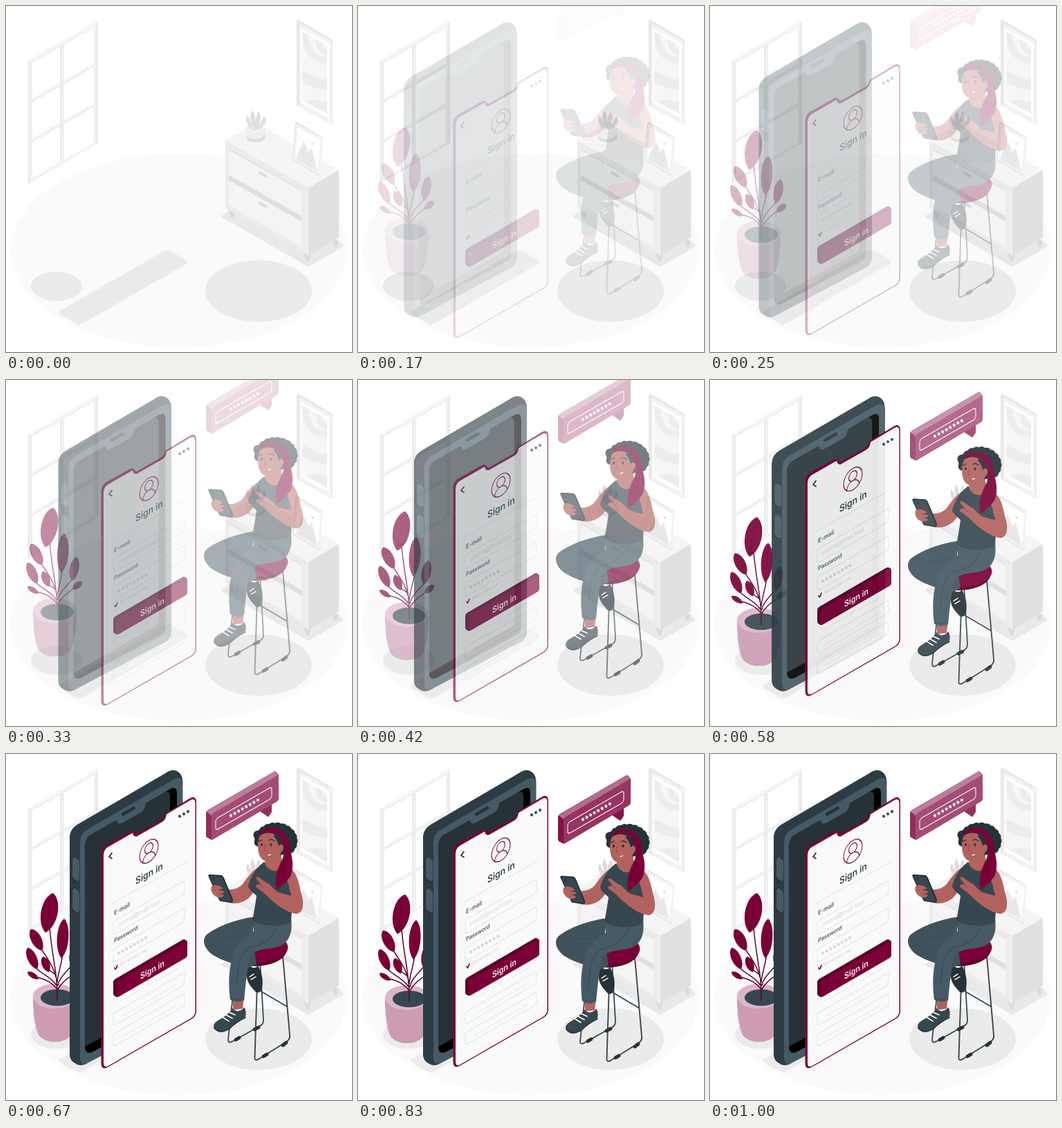
Animation, 500 px wide and 500 px high, one loop 1040 ms. Source, as an HTML page with a canvas:

```html
<!DOCTYPE html>
<html lang="en">
<head>
<meta charset="utf-8">
<title>Sign in</title>
<style>
html, body { margin: 0; width: 100%; height: 100%; overflow: hidden; background: #fff; }
canvas { display: block; width: 500px; height: 500px; }
</style>
</head>
<body>
<canvas id="stage"></canvas>
<script>
const SIZE = 500, LOOP = 1040, STEP = 1000 / 24;
const dpr = window.devicePixelRatio || 1;
const stage = document.getElementById('stage');
stage.width = stage.height = SIZE * dpr;
const view = stage.getContext('2d');

const WINE = '#7b0037', DEEP = '#5c0029', DARK = '#263238', SLATE = '#37474f',
      STEEL = '#455a64', SKIN = '#b1625f', CREASE = '#8c4548', SHADE = '#ebebeb';
let c;

function layer(paint) {
  const cv = document.createElement('canvas');
  cv.width = cv.height = SIZE * dpr * 2;
  c = cv.getContext('2d');
  c.scale(dpr * 2, dpr * 2);
  c.lineCap = c.lineJoin = 'round';
  paint();
  return cv;
}

function fill(d, color) {
  c.fillStyle = color;
  c.fill(new Path2D(d));
}

function line(d, color, width) {
  c.strokeStyle = color;
  c.lineWidth = width;
  c.stroke(new Path2D(d));
}

function oval(x, y, rx, ry, color, turn = 0) {
  c.fillStyle = color;
  c.beginPath();
  c.ellipse(x, y, rx, ry, turn, 0, Math.PI * 2);
  c.fill();
}

// Draws on the left-facing isometric plane with its origin at x, y.
function iso(x, y, paint) {
  c.save();
  c.transform(0.866, -0.5, 0, 1, x, y);
  paint();
  c.restore();
}

function isoText(x, y, text, size, weight, color) {
  iso(x, y, () => {
    c.font = `${weight} ${size}px Inter, Arial, sans-serif`;
    c.fillStyle = color;
    c.fillText(text, 0, 0);
  });
}

function isoBox(x, y, w, h, r, color, width) {
  iso(x, y, () => {
    c.beginPath();
    c.roundRect(0, 0, w / 0.866, h, r);
    c.strokeStyle = color;
    c.lineWidth = width;
    c.stroke();
  });
}

function isoDots(x, y, count, gap, r, color) {
  for (let i = 0; i < count; i++) oval(x + i * gap, y - i * gap * 0.577, r, r * 1.1, color);
}

function paintWindow() {
  fill('M32 78L133 21V198L32 257Z', '#f0f0f0');
  fill('M35 80L133 25V22L32 78Z', '#f8f8f8');
  line('M32.5 79V256', '#e6e6e6', 1.6);
  line('M132 23V198', '#e8e8e8', 1.6);
  for (let row = 0; row < 3; row++) {
    const y = row * 57.5;
    fill(`M38 ${82 + y}L78 ${59 + y}V${110 + y}L38 ${133 + y}Z`, '#fff');
    fill(`M84 ${56 + y}L127 ${31 + y}V${82 + y}L84 ${107 + y}Z`, '#fff');
    line(`M38 ${134 + y}L78 ${111 + y}M84 ${108 + y}L127 ${83 + y}`, '#f8f8f8', 2);
  }
  line('M79 58V224', '#e8e8e8', 1.4);
}

function paintArt() {
  fill('M420 21L423 20L472 49V172L420 143Z', '#e8e8e8');
  fill('M424 25L471 51V171L424 144Z', '#f3f3f3');
  fill('M426 31L467 54V163L426 140Z', '#fff');
  c.save();
  c.clip(new Path2D('M428 37L464 57V156L428 136Z'));
  fill('M428 37L464 57V156L428 136Z', '#f6f6f6');
  line('M431 35C434 62 440 80 466 77M452 48C452 62 458 67 468 66', '#ededed', 9);
  line('M426 101C440 107 448 114 468 114', '#ededed', 15);
  fill('M432 141C440 132 452 137 466 139V160Z', '#ededed');
  c.restore();
}

function paintCabinet() {
  fill('M310 304L323 296L480 338L488 347L437 377Z', '#e9e9e9');
  for (const [x, y] of [[325, 297], [434, 360], [474, 339]]) {
    fill(`M${x - 5} ${y - 5}L${x + 6} ${y}L${x + 4} ${y + 10}L${x} ${y + 9}L${x - 2} ${y + 2}Z`, '#dcdcdc');
  }
  fill('M317 194L361 168L481 237L437 263Z', '#f5f5f5');
  fill('M317 194L437 263V361L317 292Z', '#ececec');
  fill('M437 263L481 237V335L437 361Z', '#e0e0e0');
  fill('M322 206L428 267V349L322 288Z', '#e0e0e0');
  fill('M322 208L428 268V304L322 244Z', '#f4f4f4');
  fill('M322 252L428 312V349L322 288Z', '#f4f4f4');
  line('M436 263V360', '#f0f0f0', 2);
  line('M367 241L376 246M367 284.500L376 290', '#dedede', 4);

  oval(361, 189, 14, 8, '#dedede');
  fill('M346 174V185C349 195 371 195 374 185V174Z', '#efefef');
  oval(360, 174, 14, 8, '#f8f8f8');
  oval(360, 174, 11, 6, '#e6e6e6');
  for (const [x, y] of [[349, 158], [356, 151], [365, 152], [373, 159]]) {
    fill(`M360 176C${x - 6} ${y + 13} ${x - 2} ${y + 4} ${x} ${y}C${x + 5} ${y + 7} ${x + 4} ${y + 15} 360 176Z`, '#dedede');
  }

  fill('M418 168L421 168L458 190L453 246L414 223Z', '#e6e6e6');
  fill('M420 170L458 191L453 244L415 222Z', '#f3f3f3');
  fill('M422 175L455 194L450 239L418 220Z', '#fff');
  fill('M419 221L430 195L437 211L442 206L450 239Z', '#e8e8e8');
  oval(443, 199, 2, 2.300, '#e8e8e8');
}

function paintRoom() {
  oval(250, 353, 243, 140, '#fafafa');
  oval(73, 405, 37, 21, SHADE);
  fill('M77 441L227 355Q233 351 238 354L260 367Q264 370 260 373L112 458Q107 461 102 459L79 446Q75 443 77 441Z', SHADE);
  oval(365, 412, 77, 44.500, SHADE);
  paintWindow();
  paintArt();
  paintCabinet();
}

function leaf(x0, y0, x1, y1, w) {
  const dx = x1 - x0, dy = y1 - y0, n = Math.hypot(dx, dy);
  const at = (k, s) => `${x0 + dx * k - dy / n * w * s} ${y0 + dy * k + dx / n * w * s}`;
  fill(`M${x0} ${y0}C${at(0.2, 1)} ${at(0.85, 1)} ${x1} ${y1}C${at(0.85, -1)} ${at(0.2, -1)} ${x0} ${y0}Z`, WINE);
  line(`M${x0} ${y0}L${x0 + dx * 0.75} ${y0 + dy * 0.75}`, DEEP, 0.7);
}

function paintPlant() {
  fill('M39 350C39 372 41 391 46 404C54 420 88 420 95 404C100 390 102 372 102 350Z', '#cc9cb2');
  oval(70.500, 350, 31.500, 18, '#dbb6c6');
  oval(74, 352, 24, 12, SLATE);
  line('M74 356C75 318 66 290 63 250M74 330C70 308 60 296 51 282M73 334C64 322 52 318 43 309M72 320C69 316 64 314 60 311' +
    'M74 340C66 330 58 326 46 323M74 330C75 316 80 306 82 288M75 334C78 322 88 314 97 303M75 340C82 328 92 322 99 317', DEEP, 1.500);
  leaf(57, 258, 68, 201, 16);
  leaf(52, 284, 36, 253, 10);
  leaf(45, 311, 31, 280, 9);
  leaf(62, 315, 53, 293, 7.500);
  leaf(47, 325, 31, 315, 5);
  leaf(80, 295, 84, 238, 11);
  leaf(95, 307, 102, 272, 9);
  leaf(96, 319, 110, 308, 6);
}

function paintPhone() {
  fill('M92 121Q92 109 103 102L230 28Q241 20 249 26Q255.500 30 255.500 43V364Q255 373 247 378L119 446Q108 453 100 447Q92 443 92 434Z', '#2d3c44');
  fill('M107 128Q107 116 118 109L240 38Q255 29 255.500 44V364Q255 373 247 378L119 446Q107 452 107 438Z', STEEL);
  fill('M114 133Q114 122 122 117L235 52Q247 44 247 57V358Q247 365 240 369L124 431Q114 434 114 423Z', '#000');
  fill('M114 133Q114 122 122 117L228 56Q237 51 237 62V350Q237 354 232 357L114 423Z', DARK);
  fill('M154 97L160 96Q162 103 169 99L194 85Q201 81 202 71L207 65Z', STEEL);
  line('M169 87L185 78', DARK, 4.500);
  for (const y of [148, 193]) {
    fill(`M94 ${y + 5}Q95 ${y - 2} 100 ${y + 1}Q106 ${y + 4} 106 ${y + 10}V${y + 33}Q104 ${y + 40} 99 ${y + 36}Q94 ${y + 33} 94 ${y + 28}Z`, DARK);
    fill(`M96 ${y + 5}Q97 ${y} 101 ${y + 2}Q106 ${y + 5} 106 ${y + 10}V${y + 33}Q104 ${y + 38} 100 ${y + 34}Q96 ${y + 32} 96 ${y + 28}Z`, STEEL);
  }
}

function paintForm() {
  fill('M137.500 145Q137.500 136 145 131L181 111L185 112L188 116L225 95Q229 92 230 86L264 65Q275 58 275 71V371Q275 379 268 383L148 452Q137.500 458 137.500 446Z', WINE);
  fill('M141 147Q141 138 148 134L183 114Q184 120 189 119L226 98Q231 95 232 87L265 67.500Q273.500 62 273.500 72V371Q273.500 378 267 382L149 450Q141 455 141 446Z', '#fafafa');

  line('M153 143L149 148.500L153 151', DARK, 1.700);
  isoDots(251, 90, 3, 6, 1.900, SLATE);

  iso(206.500, 140.500, () => {
    c.strokeStyle = WINE;
    c.lineWidth = 1.200;
    c.beginPath();
    c.arc(0, 0, 15.500, 0, Math.PI * 2);
    c.stroke();
    c.beginPath();
    c.arc(0, -4.500, 6.800, 0, Math.PI * 2);
    c.stroke();
    c.beginPath();
    c.arc(0, 12.500, 10.500, Math.PI * 1.02, Math.PI * 1.98);
    c.stroke();
  });
  isoText(187, 189, 'Sign in', 14, 600, SLATE);
  line('M152 217L261 156', '#e3e3e3', 0.9);

  isoText(156, 233, 'E-mail', 8.800, 500, SLATE);
  isoBox(155, 242, 103, 20, 4, '#dfdfdf', 0.9);
  isoText(161, 251, 'yourid@mail.test', 9, 400, '#d8d8d8');
  isoText(156, 273, 'Password', 8.500, 500, SLATE);
  isoBox(155, 282, 103, 20, 4, '#dfdfdf', 0.9);
  isoDots(163, 288, 8, 5.600, 2, '#d6d6d6');

  isoBox(156, 307, 5, 6, 1, '#dfdfdf', 0.7);
  line('M157 309L158.500 311L161 305.500', WINE, 1.600);
  isoText(165, 307, 'Remember me', 6.500, 400, '#d4d4d4');

  fill('M155 330Q155 327 158 325L255 268.500Q257 267 260 269L262 271V290Q262 293 259 295L164 350Q161 352 159 351L156 349Q155 348 155 345Z', DEEP);
  fill('M160 332Q160 329 163 327L258 272Q262 270 262 274V290Q262 293 259 295L164 350Q160 352 160 348Z', WINE);
  isoText(194, 326, 'Sign in', 12.300, 600, '#fff');

  isoText(203, 337, 'or', 7, 400, '#d8d8d8');
  line('M166 357L199 338M215 329L248 310', '#e5e5e5', 0.8);
  for (const y of [375, 405]) {
    isoBox(155, y, 103, 18, 4, '#e0e0e0', 0.9);
    line(`M167 ${y + 4}L246 ${y - 41.500}`, '#e8e8e8', 1);
  }
}

function paintStool() {
  line('M330 330L321 413Q321 418 326 416L367 393Q372 391 372 384L367 298M367 342L406 365', SLATE, 1.800);
  line('M364 300L359.500 438Q359 444 365 441L405 416Q411 412 410 406L400 292', SLATE, 1.900);
  line('M332 413L337 410M359 398L365 395M372 437L377 434M400 421L405 417', DARK, 5);
  fill('M328 280C329 307 357 310 380 304C400 299 408 288 406.500 276Z', DEEP);
  oval(368, 281, 39.500, 20, WINE, -0.05);
}

function paintLegs() {
  fill('M350 303C355 311 361 310 364 306C370 316 372 328 370 338Q367 347 361 344C355 337 347 330 348 318Z', DARK);
  line('M352 322L358 318M354 326L361 322', '#fff', 1.400);
  fill('M360 235C332 239 305 249 290 261C282 269 287 281 297 289C313 300 332 303 348 310L362 304L356 262Z', '#3f535d');
  fill('M328 352H344L342 368L328 370Z', SKIN);
  fill('M327 367C332 374 340 372 344 366Q348 371 346 380C337 385 330 390 324 397Q309 407 301 397Q298 391 305 386C315 380 322 376 327 367Z', SLATE);
  line('M301 396Q308 405 323 397Q333 387 346 381', DARK, 1.500);
  line('M314 381L322 386M318 377L327 382M322 373L331 377', '#fff', 1.700);
  fill('M358 235C382 242 400 244 412 240C415 262 406 277 388 280C371 283 358 282 352 295C348 315 346 336 344 356Q334 361 324 355C321 330 322 311 328 291C332 276 345 265 358 256Z', STEEL);
  line('M324 352Q334 358 344 353M391 249Q384 273 352 280Q335 288 333 335M313 264Q332 267 345 261', SLATE, 0.9);
}

function paintTorso() {
  fill('M368 162C357 167 349 178 342 188C334 196 325 197 313 195L306 205C320 220 339 218 351 208C360 199 366 187 369 178Z', SKIN);
  fill('M378 148L397 144L402 166L382 178L370 163Z', SKIN);
  fill('M373 156C364 162 354 175 350 191C352 197 358 201 362 205C360 219 358 231 356 240C370 250 394 251 412 243C413 222 416 199 415 186C412 174 408 164 402 160C394 173 379 172 373 156Z', SLATE);
  fill('M401 160C416 163 422 178 426 199C431 214 431 229 420 231C403 229 386 214 373 201L361 192Q361 188 368 188L362 181Q360 177 365 178L376 186C383 188 387 197 394 200L412 205C410 190 403 176 401 160Z', SKIN);
  line('M412 204L409 193M366 188L373 193', CREASE, 0.9);

  fill('M293 178Q291 174 295 174L310 175Q313 175 315 179L328 210Q329 215 325 215L311 213Q308 213 307 209Z', DARK);
  fill('M295 178Q294 176 297 176L309 177Q312 177 313 180L326 210Q327 213 324 213L312 212Q309 212 308 209Z', SLATE);
  oval(300, 180, 1.500, 1.800, DARK);
  fill('M298 190C306 188 314 193 313 195L306 196L315 198Q316 202 308 201L315 204Q314 208 306 207C298 205 294 195 298 190Z', SKIN);
}

function paintHead() {
  oval(390, 125, 27, 22, DARK);
  for (let i = 0; i < 15; i++) {
    const a = Math.PI * (0.97 + i * 0.094);
    oval(390 + Math.cos(a) * 25, 125.500 + Math.sin(a) * 20.500, 6.500, 6.300, DARK);
  }
  oval(364, 117, 6.500, 6.500, DARK);
  fill('M367 118C363 127 363 140 367 148Q372 157 384 155C395 152 400 143 398 131L391 118Q379 110 367 118Z', SKIN);
  fill('M389 115Q399 119 399 134L394 137Q394 126 387 119Z', DARK);
  oval(397, 136, 4, 5.500, SKIN, 0.2);
  fill('M366 113Q378 104 392 108C406 113 410 127 411 141C417 160 413 172 411 177Q403 188 391 196C387 178 392 166 400 151C404 136 400 122 391 115Q379 110 367 117Z', WINE);
  line('M405 139Q408 163 397 183M402 153Q399 166 394 176', DEEP, 0.8);
  oval(369.500, 131, 1.500, 2, DARK);
  oval(383, 131, 1.500, 2, DARK);
  line('M366 126L370 124M380 124.500Q384 122 388 126', DARK, 1.300);
  line('M375 131L373 139L376 140', CREASE, 0.9);
  fill('M378 145Q381 145 383.500 143Q383 147.500 379 147Z', '#f0dada');
  line('M377.500 145Q381 145 384 142.500', CREASE, 0.8);
}

function paintPerson() {
  paintStool();
  paintLegs();
  paintTorso();
  paintHead();
}

function paintBubble() {
  fill('M289 86Q289 83 292 81L386 26Q389 24 391 26L394 30V64Q394 67 391 69L300 123Q297 125 295 123L291 121Q289 120 289 117Z', WINE);
  fill('M290 83L386 26Q389 24 391 26L394 30L299 86L297 89Z', '#ad6285');
  fill('M366 82L384 72V84L379 91Z', WINE);
  fill('M297 90Q297 87 300 85L391 32Q394 30 394 33V64Q394 67 391 69L300 123Q297 125 297 121Z', '#8f2557');
  isoBox(303, 94, 81, 16.500, 4, '#fff', 1.200);
  isoDots(325, 89, 8, 5.550, 2, '#fff');
}

const room = layer(paintRoom);
const actors = [
  { art: layer(paintPlant), dy: -30 },
  { art: layer(paintPhone), dx: -30 },
  { art: layer(paintForm), dy: 30 },
  { art: layer(paintPerson), dy: -30 },
  { art: layer(paintBubble), dy: -85, fade: p => 0.82 * p * p }
];

const bez = (s, a, b) => 3 * (1 - s) * (1 - s) * s * a + 3 * (1 - s) * s * s * b + s * s * s;

// Overshooting ease: cubic-bezier(.36, -.01, .5, 1.38)
function ease(u) {
  let lo = 0, hi = 1;
  for (let i = 0; i < 24; i++) {
    const mid = (lo + hi) / 2;
    if (bez(mid, 0.36, 0.5) < u) lo = mid; else hi = mid;
  }
  return bez(lo, -0.01, 1.38);
}

function put(art, x, y, alpha) {
  view.globalAlpha = Math.max(0, Math.min(1, alpha));
  view.drawImage(art, x, y, SIZE, SIZE);
}

function draw(ms) {
  const tick = Math.floor((ms % LOOP + 5) / STEP);
  const p = tick < 2 ? 0 : ease(Math.min(1, (tick + 1) / 25));
  view.setTransform(dpr, 0, 0, dpr, 0, 0);
  view.globalAlpha = 1;
  view.fillStyle = '#fff';
  view.fillRect(0, 0, SIZE, SIZE);
  put(room, 0, 0, 1);
  for (const { art, dx = 0, dy = 0, fade = q => q } of actors) {
    put(art, dx * (1 - p), dy * (1 - p), fade(p));
  }
}

const start = performance.now();
function loop() {
  draw(performance.now() - start);
  requestAnimationFrame(loop);
}
loop();
</script>
</body>
</html>
```
